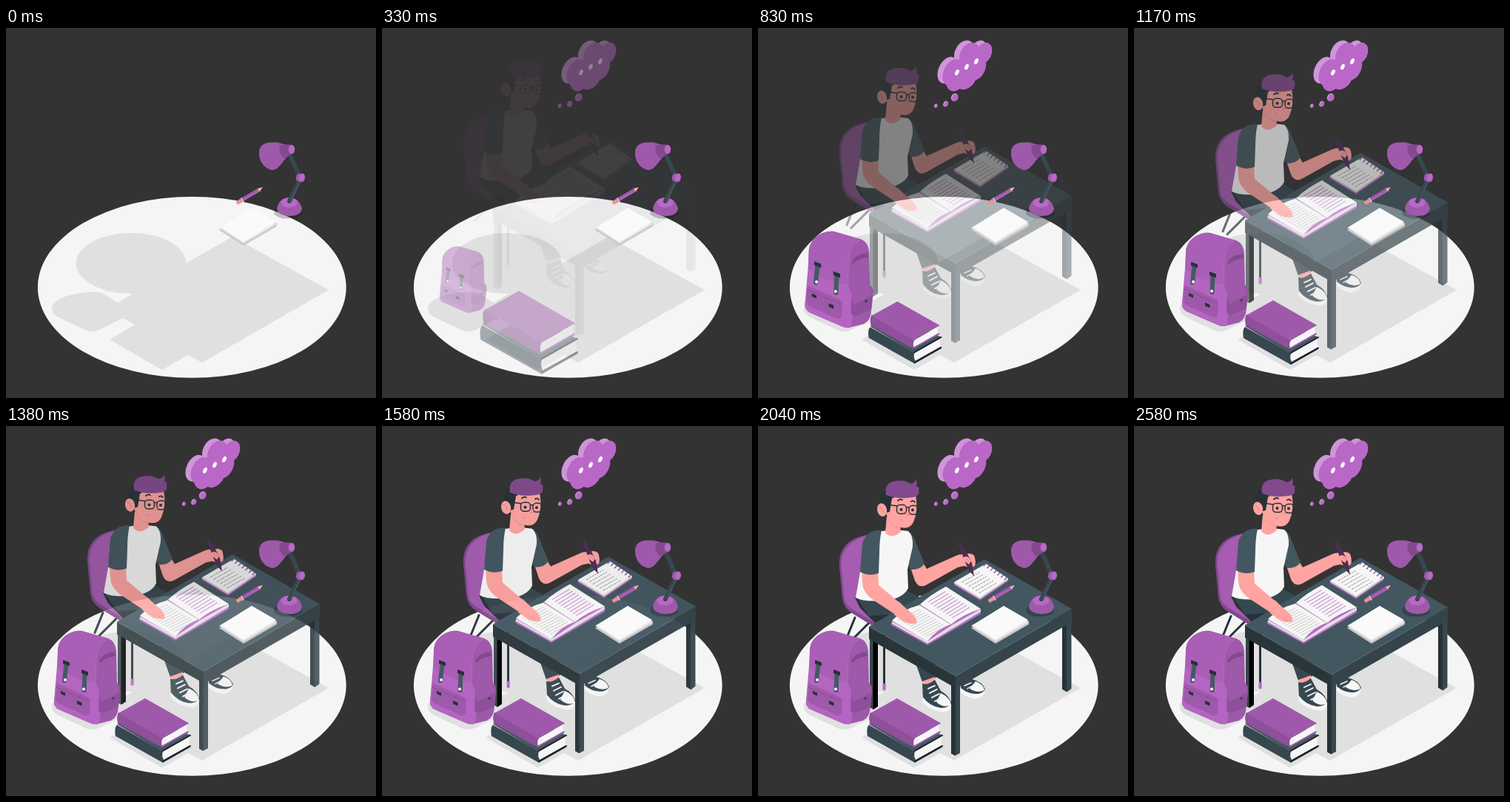
An HTML page for the animation above (2.62 s loop, 500x500 px).

```html
<!DOCTYPE html>
<html lang="en">
<head>
<meta charset="utf-8">
<title>Student at a desk</title>
<style>
html, body { margin: 0; width: 100%; height: 100%; overflow: hidden; background: #333; }
svg { display: block; width: 100vw; height: 100vh; }
.light { fill: #ba68c8; }
.purple { fill: #9f59ab; }
.deep { fill: #824a8d; }
.steel { fill: #435761; }
.slate { fill: #37474f; }
.ink { fill: #263238; }
.skin { fill: #ffa4a1; }
.white { fill: #f6f6f6; }
.line { fill: none; stroke-linecap: round; stroke-linejoin: round; }
</style>
</head>
<body>
<svg viewBox="0 0 500 500">
  <g id="floor">
    <ellipse cx="251.3" cy="350.4" rx="208.4" ry="122.4" fill="#f5f5f5"/>
    <g fill="#e0e0e0">
      <ellipse cx="169" cy="318" rx="74.3" ry="41"/>
      <path d="M306 282L436 354 265 452 246 442 211 462 140 421 174 401 158 392 151 371 171 359 243 318Z"/>
      <path d="M62 379C61 369 82 358 118 356.500Q126 356 131 359L151 371 158 392 126 408Q118 412 109 409L69 390Q62 386 62 379Z"/>
    </g>
  </g>

  <g id="desk">
    <g id="chair">
      <path class="line" stroke="#263238" stroke-width="3" d="M131 257L120 284M150 264L126 288M170.500 270V350"/>
      <path d="M168.500 346h4.200v8q-2 3-4.200 0z" fill="#ba68c8"/>
      <path class="deep" d="M148 145C119 150 109 166 110 188L114 231Q116 244 127 251L153 267 166 262 150 220Z"/>
      <path fill="#a55cb1" d="M149 146C124 151 112 166 112.500 187L116.500 230Q118 240 128 246L158 264 172 240 150 150Z"/>
    </g>
    <g id="legs">
      <path class="ink" d="M131 230L203 218 222 232 200 262 158 264 138 244Z"/>
      <path class="slate" d="M134 231Q168 242 202 220L222 232 196 251 150 255Z"/>
      <path class="slate" d="M203 290L238 300 241 338 222 344Z"/>
      <path class="skin" d="M222 343L239 337 239 343 225 348Z"/>
      <path class="slate" d="M222 346Q229 349 239 341L247 356Q260 363 262 376 260 384 247 383 232 379 223 367Z"/>
      <path class="white" d="M222.500 364Q232 377 247 379 256 379 261 374 263 382 253 384.500 234 384 222.500 371ZM247 359Q260 365 261 375 251 380 241 371Z"/>
      <path class="line" stroke="#f5f5f5" stroke-width="1.900" d="M230 353l9-4M232 359l10-5M235 365l10-5M239 370l9-5"/>
      <path class="slate" d="M274 340L289 340Q304 344 307 354 306 364 292 365 279 362 274 354Z"/>
      <path class="white" d="M274 352Q285 361 297 360 304 359 307 354 307 365 293 367 280 364 274 358ZM294 343Q305 347 306 355 297 360 286 353Z"/>
      <path class="line" stroke="#f5f5f5" stroke-width="1.500" d="M279 349l9-4M283 353l9-5"/>
    </g>
    <g id="table">
      <path class="slate" d="M411 262h12.500v91l-6 4.500-6.500-4z"/>
      <path class="ink" d="M411 262h6v95l-6-3.500z"/>
      <path d="M151 280h11v97l-6 4-5-3z" fill="#000"/>
      <path d="M151 280h4.500v100l-4.500-2z" fill="#37474f"/>
      <path class="slate" d="M261 340h12v100l-6.500 3.500-5.500-3z"/>
      <path class="ink" d="M261 340h5.800v103.500l-5.800-3z"/>
      <path d="M150 269L267 336V352L150 286Z" fill="#293539"/>
      <path d="M267 336L424 245V263L267 353Z" fill="#35444b"/>
      <path class="steel" d="M150 269L306 178 424 245 267 336Z"/>
    </g>
    <g id="book">
      <path class="light" d="M180 264L219 240 253 216 301 248 301 252 229 294 180 267Z"/>
      <path d="M181 262L229 289 262 267 301 245 301 249 229 292 181 265Z" fill="#e0e0e0"/>
      <path class="white" d="M181 261Q195 246 218 240L260 266Q241 273 229 289Z"/>
      <path class="white" d="M219 239Q233 226 254 215L301 245Q276 253 261 266Z"/>
      <path class="line" d="M218 240L260 266" stroke="#c8c8c8"/>
      <path class="line" id="leftText" stroke="#c4c4c4" stroke-width=".9"/>
      <path class="line" id="rightText" stroke="#cfa3d8" stroke-width="1.400"/>
    </g>
    <g id="notepad">
      <path class="purple" d="M265 210L308 185 338 205 338 208 300 234 265 213Z"/>
      <path d="M265 209L300 230 338 204V206L300 232 265 211Z" fill="#d5d5d5"/>
      <path class="white" d="M265 209L308 184 338 204 300 230Z"/>
      <path class="line" id="spiral" stroke="#824a8d" stroke-width="1.300"/>
      <path class="line" id="notes" stroke="#777" stroke-width=".8" stroke-dasharray="3 2 1.500 1.800"/>
    </g>
    <g id="person">
      <path class="skin" d="M205 186Q217 192 223 183L228 191 266 174Q273 170 281 172L291 172Q294 176 293 187L286 190 279 187 270 189 227 213Q217 218 212 207Z"/>
      <path class="steel" d="M203 140Q210 144 213 155L225 184Q219 193 206 192L199 176Z"/>
      <path class="white" d="M161 141Q183 137 203 140 210 146 209 161L202 192 203 217Q196 232 169 234 143 236 132 230L140 184 150 150Z"/>
      <path class="skin" d="M140 194Q151 199 162 194L163 213 195 240 189 255 157 234Q141 223 141 209Z"/>
      <path class="steel" d="M167 139Q147 137 141 157L138 195Q150 202 163 197L164 170Q164 152 167 139Z"/>
      <path class="skin" d="M190 235Q200 245 209 252 216 260 214 264 209 267 198 263L184 253Z"/>
      <path class="line" d="M199 258l9 5" stroke="#df8a88" stroke-width=".7"/>
      <path class="skin" d="M174 120L172 142Q180 152 193 141L192 132Z"/>
      <path d="M176 125Q183 135 193 136V132Z" fill="#ee918e"/>
      <path class="skin" d="M178 91L213 91Q217 112 210 128 205 138 193 135 177 132 173 115Z"/>
      <path class="ink" d="M168 87Q163 96 165 105L170 116 178 114 181 96 188 92 180 82Z"/>
      <ellipse class="skin" cx="167.500" cy="111.500" rx="6.500" ry="9" transform="rotate(-12 167 111)"/>
      <path class="line" d="M164 108q4 0 5 6" stroke="#df7a78"/>
      <path class="deep" d="M173 91Q170 75 185 72.500 197 70 206 76 213 75 213 70 216 74 214 80 219 80 217 85 219 92 211 94 190 98 173 91Z"/>
      <path class="line" d="M189 99q3-3 6-1M207 100q3-2 5 1" stroke="#263238" stroke-width="1.800"/>
      <g class="line" stroke="#263238" stroke-width="1.500">
        <path d="M177 104.500L188 106M200.500 108L204 108"/>
        <rect x="187.500" y="104.500" width="13" height="12" rx="4.500"/>
        <rect x="204" y="105.500" width="12" height="12" rx="4.500"/>
      </g>
      <circle class="ink" cx="193.500" cy="111" r="2"/>
      <circle class="ink" cx="209" cy="111.500" r="2"/>
      <path class="line" d="M202 111l3 7-4 0M191 125q2-1 3 0" stroke="#e57f7c"/>
      <path class="skin" d="M276 174Q286 167 292 173 295 181 293 187L288 189 279 187Z"/>
      <path d="M270.500 158L274 155.500 281 167 289 183 292 201 284 192 277 174Z" fill="#4e2c55"/>
      <path class="skin" d="M276 178Q280 172 285 176L288 181 285 185 281 182Z"/>
      <path class="line" d="M281 177l5 5" stroke="#df7a78" stroke-width=".8"/>
    </g>
  </g>

  <g id="deskItems">
    <path d="M288 273L321 294 366 268V264L333 247Z" fill="#c9c9c9"/>
    <path d="M288 270L333 246 366 265 321 291Z" fill="#e8e8e8"/>
    <path d="M290 269L332 243 365 262 321 289Z" fill="#fafafa"/>
    <path class="line" d="M315 234.500L343 218" stroke="#9f59ab" stroke-width="5" style="stroke-linecap:butt"/>
    <path class="line" d="M316 235.500L342 220" stroke="#ba68c8" stroke-width="1.300"/>
    <path d="M310.500 235L317 231 320 235 313 239Z" fill="#ef958d"/>
    <path class="line" d="M318 230l3 5" stroke="#e0c4e5" stroke-width="1.500"/>
    <path d="M340 217L347 215 343 221Z" fill="#eeb29f"/>
    <ellipse cx="381" cy="249" rx="19" ry="8.800" fill="#000" opacity=".22"/>
    <path class="purple" d="M366 244Q369 230 382 229 396 229 400 244 399 254 383 254 367 253 366 244Z"/>
    <ellipse class="light" cx="382.500" cy="236" rx="11" ry="6.500"/>
    <path class="line" d="M383 234L398 203 384 172" stroke="#37474f" stroke-width="6"/>
    <path class="line" d="M384.500 234L399 204" stroke="#455a64" stroke-width="1.500"/>
    <path class="purple" d="M342 169C342 158 350 154.500 359 154.500Q372 154 382 160L385 168Q377 177 371 185 365 192.500 359 192C348 189 342 180 342 169Z"/>
    <path class="deep" d="M370 159Q375 156 387 158L388 169Q382 172 377 177 367 169 370 159Z"/>
    <ellipse class="light" cx="386" cy="164" rx="4.300" ry="6"/>
    <rect class="purple" x="392" y="197" width="12" height="11" rx="4.500" transform="rotate(15 398 202)"/>
    <ellipse class="light" cx="400" cy="202" rx="3.700" ry="5.500" transform="rotate(15 400 202)"/>
  </g>

  <g id="bag">
    <path class="purple" d="M70 304C70 286 88 275 103 277L138 287Q148 291 149 304L150 347Q155 350 154 360L152 379Q151 394 142 398L126 402Q121 404 115 402L71 383Q64 379 65 371L69 346Z"/>
    <path fill="#b465c1" d="M69 324L121 345 129 368 126 402Q121 404 115 402L71 383Q64 379 65 371Z"/>
    <path fill="#aa5fb7" d="M70 304C70 286 88 275 103 277L136 287Q123 294 122 313L121 346Q96 346 69 325Z"/>
    <path class="line" d="M136 288Q124 296 122 315L121 345" stroke="#b966c7"/>
    <path class="deep" d="M126 319Q129 307 147 305L148 311Q136 312 127 320Z"/>
    <path class="purple" d="M68 351Q68 347 74 350L110 366Q114 368 114 373L113 388Q112 392 107 391L71 375Q67 373 67 368Z"/>
    <path class="line" d="M68 353L112 372" stroke="#824a8d" stroke-width=".8"/>
    <path fill="#8f4f9a" d="M126 362L147 350Q154 348 154 356L152 376Q151 380 146 382L131 388Q125 388 125 381Z"/>
    <path class="purple" d="M126 361L147 349Q153 349 153 360L129 373Z"/>
    <circle cx="145" cy="368" r="1.800" fill="#37474f"/>
    <path class="line" d="M81.500 321L79 344M106.500 334L105.500 357" stroke="#455a64" stroke-width="6"/>
    <path class="ink" d="M77 316l9 3.500v5l-9-3.500zM102 329l9 3.500v5l-9-3.500zM74 358l6 2.700v4l-6-2.700zM96 371l6.500 2.700v4.500l-6.500-2.700z"/>
    <circle cx="80" cy="343" r="2" fill="#f5f5f5"/>
    <circle cx="105" cy="355.500" r="2" fill="#f5f5f5"/>
  </g>

  <g id="books">
    <path class="slate" d="M150 404Q146 407 148 419L212 455 249 434V431L213 440Z"/>
    <path class="steel" d="M150 403L187 385 249 418 212 440Z"/>
    <path class="white" d="M212 440L248 420Q246 426 249 431L213 451Q210 446 212 440Z"/>
    <path class="line" d="M212 453.500L249 432.500M212 439L249 418" stroke="#182126" stroke-width="2"/>
    <path fill="#8f4f9a" d="M152 387Q149 392 151 402L210 434 246 414V411L212 419Z"/>
    <path class="purple" d="M152 388L188 368 246 401 211 422Z"/>
    <path class="white" d="M212 422L245 403Q243 408 246 412L211 432Q209 427 212 422Z"/>
    <path class="line" d="M211 433L246 413.500M211 421L246 401.500" stroke="#9f59ab" stroke-width="1.500"/>
  </g>

  <g id="thought">
    <g id="cloudBack" fill="#cf95d9"></g>
    <g id="cloud" class="light"></g>
    <g id="dots" fill="#fff"></g>
    <g id="trail"></g>
  </g>
</svg>
<script>
const $ = id => document.getElementById(id);
const DURATION = 2620;

// n parallel strokes of vector (dx, dy), each shifted by (sx, sy)
function rows(id, x, y, dx, dy, sx, sy, n) {
  let d = '';
  for (let i = 0; i < n; i++) d += `M${x + i * sx} ${y + i * sy}l${dx} ${dy}`;
  $(id).setAttribute('d', d);
}
rows('leftText', 191, 260, 27, -14, 3.6, 2.25, 11);
rows('rightText', 230, 236, 23, -14, 4.1, 2.65, 9);
rows('notes', 276, 209, 23, -13, 4.6, 2.9, 6);
rows('spiral', 305, 187, 3, -3, 4.7, 3.1, 7);

const oval = (x, y, rx, ry, fill = 'inherit') =>
  `<ellipse cx="${x}" cy="${y}" rx="${rx}" ry="${ry}" fill="${fill}" transform="rotate(25 ${x} ${y})"/>`;
const puffs = [[305, 34, 10.5, 15], [286, 37, 13, 18], [263, 60, 12, 19],
  [267, 70, 12, 16], [281, 65, 14, 19], [295, 54, 12, 18]];
$('cloudBack').innerHTML = puffs.slice(0, 3).map(([x, y, rx, ry]) => oval(x - 7, y - 3, rx, ry)).join('');
$('cloud').innerHTML = puffs.map(p => oval(...p)).join('');
$('dots').innerHTML = [[269, 60], [282, 52.5], [295, 45]].map(([x, y]) => oval(x, y, 2.4, 4.2)).join('');
$('trail').innerHTML = [[266.5, 94, 4.4, 5.4], [254.5, 103, 3, 4], [241.2, 105.5, 2, 2.7]]
  .map(([x, y, rx, ry]) => oval(x - 1, y - .5, rx, ry, '#cf95d9') + oval(x, y, rx - .4, ry - .4, '#ba68c8')).join('');

// cubic-bezier(.36, -.01, .5, 1.38)
function ease(x) {
  if (x >= 1) return 1;
  const bezier = (u, a, b) => 3 * (1 - u) ** 2 * u * a + 3 * (1 - u) * u * u * b + u ** 3;
  let lo = 0, hi = 1;
  for (let i = 0; i < 24; i++) {
    const mid = (lo + hi) / 2;
    if (bezier(mid, .36, .5) < x) lo = mid; else hi = mid;
  }
  return bezier(lo, -.01, 1.38);
}

function show(id, opacity, transform = '') {
  $(id).setAttribute('opacity', Math.max(0, Math.min(1, opacity)));
  $(id).setAttribute('transform', transform);
}
const scaleAt = (x, y, s) => `translate(${x} ${y}) scale(${s}) translate(${-x} ${-y})`;

function draw(now) {
  const t = now % DURATION + 15;
  const quick = ease(t / 1000), slow = ease(t / 2500);
  show('desk', slow, `translate(0 ${30 * (slow - 1)})`);
  show('bag', quick, scaleAt(109.5, 340, .5 + .5 * quick));
  show('books', quick, scaleAt(198.5, 411.5, 1.5 - .5 * quick));
  show('thought', quick);
}

const start = performance.now();
function tick() {
  draw(performance.now() - start);
  requestAnimationFrame(tick);
}
tick();
</script>
</body>
</html>
```
